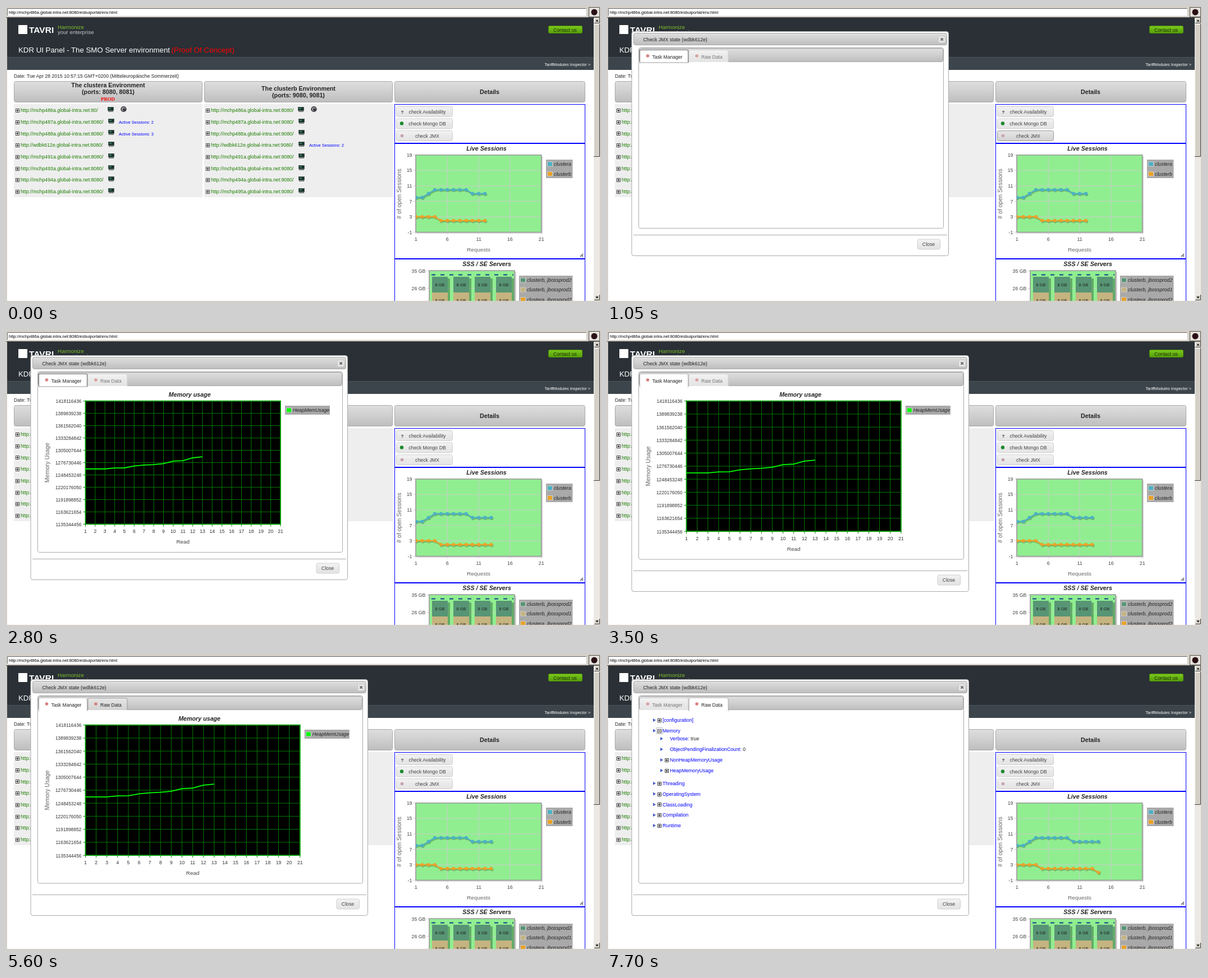
Write an HTML page that moves like this. It is 1060x528 px and loops after 8000 ms.

```html
<!DOCTYPE html>
<html lang="en">
<head>
<meta charset="utf-8">
<title>Server portal</title>
<style>
html, body { margin: 0; width: 100%; height: 100%; overflow: hidden; background: #fff; }
svg { display: block; width: 1060px; height: 528px; font-family: "Liberation Sans", Arial, sans-serif; white-space: pre; }
</style>
</head>
<body>
<svg id="stage" viewBox="0 0 1060 528"></svg>
<script>
const stage = document.getElementById('stage');
const LOOP = 8000, HOST = 'wdbk612e';

// Drawing helpers; text is placed by its vertical middle.
const rect = (x, y, w, h, fill, more = '') =>
  `<rect x="${x}" y="${y}" width="${w}" height="${h}" fill="${fill}" ${more}/>`;
const frame = (x, y, w, h, fill, stroke, r = 0) =>
  rect(x + .5, y + .5, w - 1, h - 1, fill, `stroke="${stroke}" rx="${r}"`);
const dot = (x, y, r, fill, more = '') => `<circle cx="${x}" cy="${y}" r="${r}" fill="${fill}" ${more}/>`;
const path = (d, stroke, width = 1, more = '') =>
  `<path d="${d}" fill="none" stroke="${stroke}" stroke-width="${width}" ${more}/>`;
const text = (x, y, s, size = 8.75, fill = '#222', more = '') =>
  `<text x="${x}" y="${y + size * .36}" font-size="${size}" fill="${fill}" ${more}>${s}</text>`;
const MID = 'text-anchor="middle"', END = 'text-anchor="end"', BOLD = 'font-weight="bold"', ITAL = 'font-style="italic"';
const heading = (x, y, s) => text(x, y, s, 10.7, '#222', `${MID} ${BOLD}`);
const chartTitle = (x, y, s) => text(x, y, s, 10.7, '#222', `${MID} ${BOLD} ${ITAL}`);
const sideLabel = (x, y, s) => text(0, 0, s, 10.5, '#666', `${MID} transform="translate(${x} ${y}) rotate(-90)"`);
const range = (n, f) => Array.from({ length: n }, (_, i) => f(i)).join('');
const line = pts => 'M' + pts.map(p => p.join()).join('L');

const defs = `<defs>
  <linearGradient id="bar" x2="0" y2="1"><stop stop-color="#dedede"/><stop offset=".5" stop-color="#cfcfcf"/><stop offset="1" stop-color="#bdbdbd"/></linearGradient>
  <linearGradient id="btn" x2="0" y2="1"><stop stop-color="#f3f3f3"/><stop offset=".5" stop-color="#e9e9e9"/><stop offset="1" stop-color="#e4e4e4"/></linearGradient>
  <linearGradient id="over" x2="0" y2="1"><stop stop-color="#e6e6e6"/><stop offset="1" stop-color="#d2d2d2"/></linearGradient>
  <linearGradient id="lime" x2="0" y2="1"><stop stop-color="#7cc81c"/><stop offset="1" stop-color="#55a008"/></linearGradient>
  <clipPath id="page"><rect y="20" width="1047" height="506"/></clipPath>
  <clipPath id="plot"><rect x="730" y="265" width="224" height="139"/></clipPath>
</defs>`;

const plus = (x, y, open) => frame(x, y - 3.5, 7, 7, '#fff', '#444') +
  path(`M${x + 1.5} ${y}h4` + (open ? '' : `M${x + 3.5} ${y - 2}v4`), '#000');
const monitor = (x, y) => frame(x, y, 11, 7, '#16302a', '#56645f') +
  rect(x + 2, y + 2, 4, 2, '#3d8068') + rect(x + 1, y + 7, 9, 2, '#77807c');
const gauge = (x, y) => dot(x, y, 4.4, '#9a9aa2', 'stroke="#222" stroke-width="1.4"') + dot(x + 1, y + .8, 2.4, '#33333c');
const button = (x, y, w, h, s, mid, fill = 'btn', edge = '#d0d0d0') =>
  frame(x, y, w, h, `url(#${fill})`, edge, 3) + text(mid, y + h / 2, s, 8.75, '#444', MID);

function chrome() {
  const face = '#d4d0c8';
  const bevel = (x, y, w, h) => frame(x, y, w, h, face, '#f6f4f0') +
    path(`M${x} ${y + h - .5}h${w - .5}v${.5 - h}`, '#404040');
  const arrow = (y, d) => bevel(1048, y, 10, 10) + `<path d="M1050.5 ${y + 5 - d * 1.5}h5l-2.5 ${d * 3}z"/>`;
  return rect(0, 0, 1060, 21, face) + frame(2, 4, 1032, 14, '#fff', '#f6f4f0') +
    path('M2.5 17v-12.5h1031', '#666') +
    text(5, 11.4, 'http://mchp486a.global-intra.net:8080/esbuiportal/env.html', 7.52, '#000') +
    frame(1038, 2, 20, 18, '#e4e1db', '#55524c') + dot(1048, 11, 5.5, '#2a1116') +
    rect(0, 20, 2, 508, face) + rect(1047, 21, 13, 507, '#ece9e4') + arrow(21, -1) +
    bevel(1047, 32, 11, 237) + arrow(515, 1) +
    rect(1058, 20, 2, 508, face) + rect(0, 526, 1060, 2, face) + rect(0, 20, 1058, 1, '#55524c');
}

function header() {
  return rect(2, 21, 1045, 72, '#2a3036') + rect(2, 92, 1045, 22, '#3c454b') + rect(2, 91, 1045, 1, '#4b555b') +
    rect(22, 34, 16, 16, '#fff') + text(41, 42, 'TAVRI', 15.5, '#fff', BOLD) +
    text(92, 37.8, 'Harmonize', 9.7, '#7fbf2a') + text(92, 46.5, 'your enterprise', 9.7, '#c4c8ca') +
    text(22, 77.8, 'KDR UI Panel - The SMO Server environment', 13.25, '#fff') +
    text(294.5, 77.8, '(Proof Of Concept)', 13.4, '#f00') +
    frame(966, 35, 61, 14, 'url(#lime)', '#4c8d0a', 2) + text(996, 42.5, 'Contact us', 8.75, '#1c2a0c', MID) +
    text(1041, 104.5, 'TariffModules Inspector &gt;', 7.3, '#fff', END);
}

function cluster(x, first, port, sessions) {
  const hosts = ['mchp486a', 'mchp487a', 'mchp488a', HOST, 'mchp491a', 'mchp493a', 'mchp494a', 'mchp495a'];
  return rect(x, 175, 336, 166, '#eee') + hosts.map((host, i) => {
    const y = 186 + i * 20.72;
    return plus(x + 3, Math.round(y) + .5) +
      text(x + 12, y, `http://${host}.global-intra.net:${i ? port : first}/`, 8.75, '#1d7d00') +
      monitor(x + (i ? 168 : 167), Math.round(y) - 6) +
      (sessions[i] ? text(x + 187, y + .6, `Active Sessions: ${sessions[i]}`, 7.6, '#00f') : '');
  }).join('') + gauge(x + 195.5, 184) + frame(x, 134, 336, 38, 'url(#bar)', '#aaa', 3);
}

function liveChart(count) {
  const top = 265.7, step = 27.55;
  const px = i => 730.3 + i * 11.17, py = v => top + (19 - v) * step / 4;
  const series = (f, colour) => {
    const pts = Array.from({ length: count }, (_, i) => [px(i), py(f(i))]);
    return `<g transform="translate(1.2 1.6)" opacity=".22">${path(line(pts), '#000', 3)}${pts.map(p => dot(...p, 3, '#000')).join('')}</g>` +
      path(line(pts), colour, 2.2, 'stroke-linejoin="round"') + pts.map(p => dot(...p, 3, colour)).join('');
  };
  const key = (y, s, c) => rect(964, y - 4.5, 10, 9, '#ccc') + rect(965, y - 3.5, 8, 7, c) + text(976, y, s, 8.8, '#222', ITAL);
  return chartTitle(856, 254, 'Live Sessions') + rect(732, 268, 224, 138, '#000', 'opacity=".16"') +
    rect(730, top, 224, step * 5, '#90ee90') +
    range(5, i => path(`M${px(i * 5)} ${top}v${step * 5 + 4}`, '#ccc') + text(px(i * 5), 416, 1 + i * 5, 8.9, '#444', MID)) +
    range(6, i => path(`M726 ${top + i * step}h228`, '#ccc') + text(723.5, top + i * step, 19 - i * 4, 8.9, '#444', END)) +
    path(`M730 ${top}h223.7v${step * 5}h-223.7z`, '#999', 1.6) +
    `<g clip-path="url(#plot)">` + series(i => i < 2 ? 8 : i < 3 || i > 8 ? 9 : 10, '#4bb2c5') +
    series(i => i < 4 ? 3 : i < 13 ? 2 : 1, '#eaa228') + '</g>' +
    sideLabel(700, 335, '# of open Sessions') + text(842, 434.5, 'Requests', 9.9, '#666', MID) +
    rect(962, 274, 47.5, 33, '#a9a9a9') + key(282, 'clustera', '#4bb2c5') + key(299.5, 'clusterb', '#eaa228') +
    path('M1023 447l5-5M1026 447l2-2', '#555', 1.3);
}

function serverChart() {
  const key = (y, s, c) => rect(916, y - 4.5, 10, 9, '#ccc') + rect(917, y - 3.5, 8, 7, c) + text(928, y, s, 8.9, '#222', ITAL);
  return chartTitle(856.5, 460.5, 'SSS / SE Servers') + rect(756, 474, 153, 60, '#000', 'opacity=".16"') +
    rect(754, 472, 152, 60, '#90ee90') + path('M750 472.5h156M750 503.5h156', '#ccc') +
    text(747.5, 472.5, '35 GB', 8.8, '#444', END) + text(747.5, 503.5, '26 GB', 8.8, '#444', END) +
    range(4, i => {
      const x = 759 + i * 38, label = y => text(x + 14, y, '8 GB', 7.4, '#222', MID);
      return rect(x + 3, 486, 29, 45, '#1c4a28', 'opacity=".4"') +
        rect(x, 483, 28, 29, '#579575') + rect(x, 511, 28, 20, '#c5b47f') + label(497) + label(525);
    }) +
    path('M758 479.5h146', '#14408c', 2, 'stroke-dasharray="7 9"') +
    path('M754 528v-56h152v56', '#999', 1.6) + rect(914, 481, 95.5, 50, '#a9a9a9') +
    key(489, 'clusterb, jbossprod2', '#579575') + key(506, 'clusterb, jbossprod1', '#c5b47f') +
    key(523.5, 'clustera, jbossprod2', '#eaa228');
}

function details(s) {
  const box = (y, h) => frame(692, y, 340, h, '#fff', '#00f');
  return frame(692, 134, 340, 38, 'url(#bar)', '#aaa', 3) + heading(861.5, 153, 'Details') +
    box(175, 70) + box(245, 206) + box(451, 90) +
    button(695, 179, 101, 19, 'check Availability', 750.5) +
    button(695, 200.5, 101, 19, 'check Mongo DB', 750.5) +
    button(695, 222, 101, 19, 'check JMX', 750.5, s.press ? 'over' : 'btn', s.press ? '#999' : '#d0d0d0') +
    text(706, 189, '?', 8, '#333', `${MID} ${BOLD}`) + dot(705, 209.5, 3.2, '#1a8a2c') + dot(705.5, 231.5, 2.8, '#c9a0b4') +
    liveChart(s.count) + serverChart();
}

function memoryChart(big) {
  const w = big ? 382.3 : 347.5, h = big ? 232.5 : 219.7, x = 141.5, y = 126.7;
  // Heap levels, as a share of the height below the top edge
  const heap = [.551, .551, .551, .544, .543, .528, .52, .516, .508, .488, .484, .461, .453];
  return chartTitle(x + w / 2 + 12, 115, 'Memory usage') + rect(x, y, w, h, '#000') +
    range(21, i => path(`M${x + w * i / 20} ${y}v${h + 4}`, '#007a00') +
      text(x + w * i / 20, y + h + 12.6, i + 1, 8.7, '#333', MID)) +
    range(11, i => path(`M${x - 4} ${y + h * i / 10}h${w + 4}`, '#007a00') +
      text(x - 7, y + h * i / 10 + .3, 1418116436 - i * 28277198, 8.4, '#333', END)) +
    path(`M${x} ${y}h${w}v${h}h${-w}z`, '#00a000', 1.8) +
    path(line(heap.map((v, i) => [x + w * i / 20, y + h * v])), '#0f0', 1.8, 'stroke-linejoin="round"') +
    sideLabel(73.5, y + h / 2, 'Memory Usage') + text(x + w / 2, y + h + 31.3, 'Read', 9.9, '#444', MID) +
    rect(x + w + 8, 135, 80, 16, '#a9a9a9') + rect(x + w + 10, 138.5, 10, 9, '#ccc') +
    rect(x + w + 11, 139.5, 8, 7, '#0f0') + text(x + w + 22, 143, 'HeapMemUsage', 8.7, '#222', ITAL);
}

function rawTree(open) {
  const bullet = (x, y) => `<path d="M${x} ${y - 3}l5 3l-5 3z" fill="#4a5fc8"/>`;
  const node = (x, y, s, minus) => bullet(x, y) + plus(x + 8, Math.round(y) + .5, minus) + text(x + 17, y, s, 8.75, '#00f');
  const leaf = (y, s, v) => bullet(95, y) + text(112, y, `${s}: <tspan fill="#222">${v}</tspan>`, 8.75, '#00f');
  const names = ['[configuration]', 'Memory', 'Threading', 'OperatingSystem', 'ClassLoading', 'Compilation', 'Runtime'];
  return names.map((s, i) => node(82, 118 + i * 18.8 + (open && i > 1 ? 75.2 : 0), s, open && i == 1)).join('') +
    (open ? leaf(151, 'Verbose', 'true') + leaf(170, 'ObjectPendingFinalizationCount', 0) +
      node(95, 189, 'NonHeapMemoryUsage') + node(95, 207.7, 'HeapMemoryUsage') +
      path('M88.5 131.5h10v11h-10z', '#777', 1, 'stroke-dasharray="1 1"') : '');
}

function dialog(s) {
  const dx = s.big ? 36 : 0, dy = s.big ? 21 : 0;
  const tab = (x, w, label, on, hover) => {
    const top = on ? 78 : 78.5, h = on ? 24 : 21.5;
    return `<path d="M${x + .5} ${top + h}v${3 - h}q0 -3 3 -3h${w - 7}q3 0 3 3v${h - 3}" fill="${on ? '#fff' : hover ? 'url(#over)' : 'url(#btn)'}" stroke="${on ? '#aaa' : hover ? '#999' : '#d0d0d0'}"/>` +
      dot(x + 14.5, 89, 2.8, on || hover ? '#d88080' : '#dba0a0') + text(x + 22.5, 90.8, label, 8.6, on || hover ? '#222' : '#777') +
      (on && s.focus ? path(`M${x + .5} 78.5h${w - 1}v22.5h${1 - w}z`, '#333', 1, 'stroke-dasharray="1 1"') : '');
  };
  return frame(43.5, 45, 565.5 + dx, 401 + dy, '#fff', '#aaa', 4) +
    frame(47, 48, 559 + dx, 22, 'url(#bar)', '#aaa', 3) + text(64.5, 59.5, `Check JMX state (${HOST})`, 8.75) +
    frame(590 + dx, 53, 13, 13, '#e6e6e6', '#c8c8c8', 2) +
    path(`M${594.5 + dx} 57.3l4.4 4.4m0 -4.4l-4.4 4.4`, '#666', 1.7) +
    frame(56, 74, 544 + dx, 323 + dy * .6, '#fff', '#aaa', 3) +
    frame(57, 75, 542 + dx, 25, 'url(#bar)', '#aaa', 3) +
    tab(58, 87, 'Task Manager', !s.raw) + tab(145.5, 71, 'Raw Data', s.raw, s.hover) +
    (s.raw ? rawTree(s.open) : s.chart ? memoryChart(s.big) : '') +
    rect(47, 408 + dy, 559 + dx, 1, '#aaa') + button(552.5 + dx, 415.5 + dy, 41.5, 19, 'Close', 573 + dx);
}

function scene(s) {
  return defs + rect(0, 0, 1060, 528, '#fff') + `<g clip-path="url(#page)">` + header() +
    text(14, 125, 'Date: Tue Apr 28 2015 10:57:15 GMT+0200 (Mitteleuropäische Sommerzeit)', 8.68) +
    cluster(14, 80, 8080, { 1: 2, 2: 3 }) +
    heading(182, 141, 'The clustera Environment') + heading(182, 153, '(ports: 8080, 8081)') +
    text(181.5, 165.5, 'PROD', 8.8, '#f00', `${MID} ${BOLD} font-family="Liberation Serif, serif"`) +
    cluster(353, 8080, 9080, { 3: 2 }) +
    heading(521, 147, 'The clusterb Environment') + heading(521, 159, '(ports: 9080, 9081)') +
    details(s) + (s.shown ? dialog(s) : '') + '</g>' + chrome();
}

const stateAt = t => ({
  shown: t >= 1050,
  press: t >= 700 && t < 2800,
  chart: t >= 2800,
  big: t >= 3500,
  hover: t >= 5250 && t < 5950,
  raw: t >= 5950,
  open: t >= 6650,
  focus: t < 3150 || (t >= 5950 && t < 6650),
  count: t < 2800 ? 12 : t < 7350 ? 13 : 14
});

let last;
const start = performance.now();
function tick(now) {
  const s = stateAt(Math.max(0, now - start) % LOOP), key = JSON.stringify(s);
  if (key !== last) stage.innerHTML = scene(s);
  last = key;
  requestAnimationFrame(tick);
}
tick(start);
</script>
</body>
</html>
```
